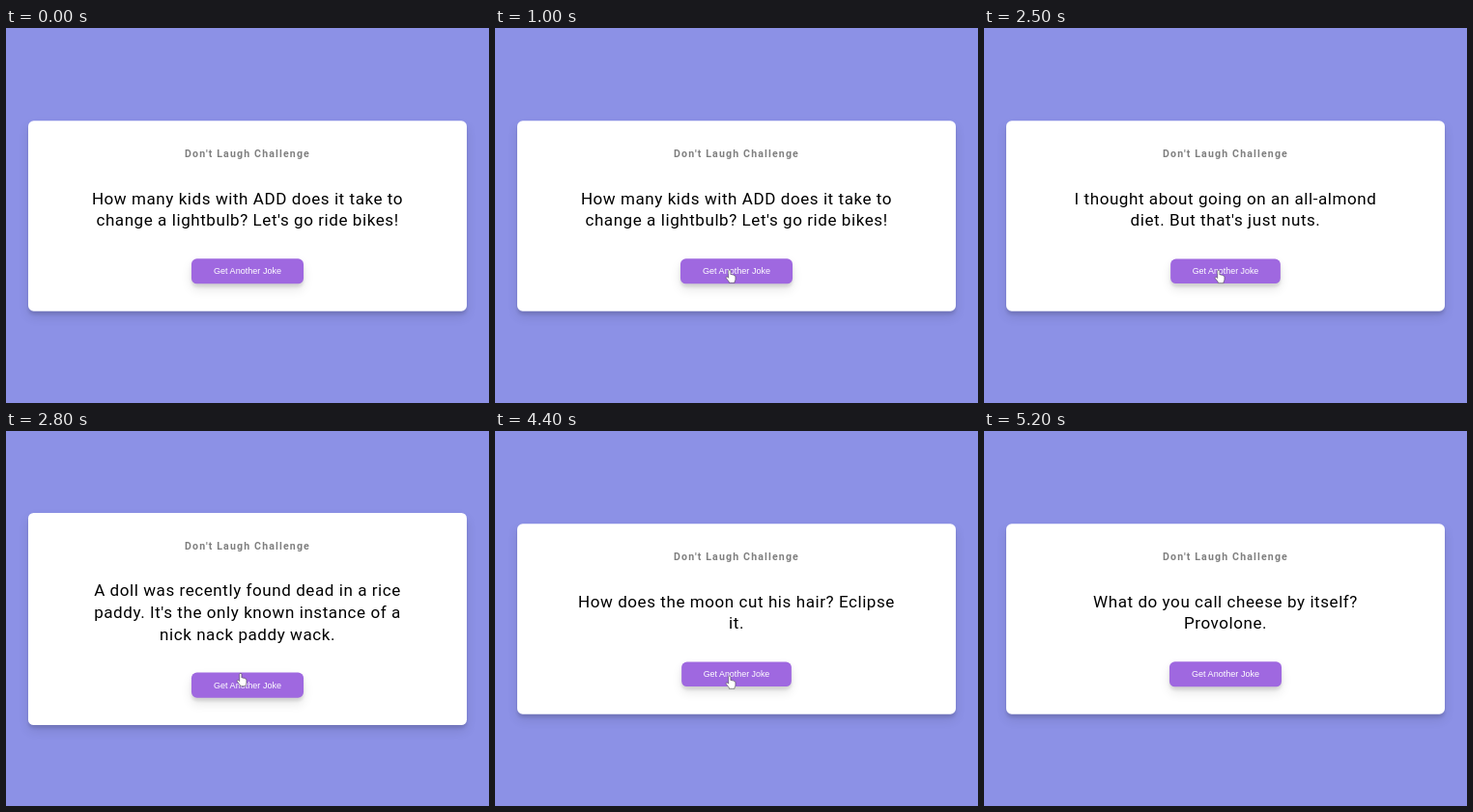
These frames come from a looping animation (500 by 389 pixels, 5.6 s). An HTML page:

```html
<!DOCTYPE html>
<html lang="en">
<head>
<meta charset="utf-8">
<title>Joke card</title>
<style>
  html, body { margin: 0; width: 100%; height: 100%; overflow: hidden; background: #8c91e6; }
  svg { display: block; width: 100%; height: 100%; }
  text { text-anchor: middle; }
  .title { font: 700 18.72px Roboto, sans-serif; letter-spacing: 2px; fill-opacity: .5; }
  .joke { font: 400 30px Roboto, sans-serif; letter-spacing: 1px; }
  .label { font: 400 16px "Liberation Sans", Arial, sans-serif; fill: #fff; }
  .cursor { fill: #fff; stroke: #333; stroke-width: .5; stroke-linejoin: round; }
</style>
</head>
<body>
<svg viewBox="0 0 500 389">
  <defs>
    <filter id="wide" x="-50%" y="-100%" width="200%" height="300%"><feGaussianBlur stdDeviation="10"/></filter>
    <filter id="tight" x="-50%" y="-100%" width="200%" height="300%"><feGaussianBlur stdDeviation="3"/></filter>
  </defs>
  <rect width="500" height="389" fill="#8c91e6"/>
  <g id="card">
    <g id="panel"></g>
    <text class="title" y="67.4">Don't Laugh Challenge</text>
    <g id="joke"></g>
    <g id="button">
      <g id="face"></g>
      <text class="label" y="5.5">Get Another Joke</text>
    </g>
  </g>
  <path id="hand" class="cursor" d="M-1.1 1Q-1.1 0 0 0T1.1 1V4.6Q2.4 4 2.9 5Q4.2 4.5 4.6 5.6Q6.1 5.3 6.1 7V9.4Q6.1 11 5.2 12V13.3H-.5V12.2L-3.5 8.4Q-4 7.2-3 6.9Q-2.2 6.8-1.1 8.2Z"/>
  <path id="arrow" class="cursor" d="M0 0V10L2.4 7.8L4 11.3L5.4 10.7L3.9 7.3H7Z"/>
</svg>
<script>
const LOOP = 5600, STEP = 100, SCALE = 0.5675, CENTER = { x: 250, y: 195 };
const LINE = 40, PAD = 50, TOP = 122, BUTTON = { w: 204.5, h: 46 };

const jokes = [
  { at: 0, lines: ["How many kids with ADD does it take to", "change a lightbulb? Let's go ride bikes!"] },
  { at: 1300, lines: ["I thought about going on an all-almond", "diet. But that's just nuts."] },
  { at: 2800, lines: ["A doll was recently found dead in a rice", "paddy. It's the only known instance of a", "nick nack paddy wack."] },
  { at: 3800, lines: ["How does the moon cut his hair? Eclipse", "it."] },
  { at: 4700, lines: ["What do you call cheese by itself?", "Provolone."] }
];
const presses = [[800, 1000], [1700, 1800], [2500, 2600], [3500, 3600], [4400, 4500]];

// time, x, y of the pointer tip
const path = [
  [300, 257, 360], [400, 250, 315], [500, 245, 272], [600, 242.8, 251],
  [3400, 242.8, 251.5], [3700, 242.8, 254], [4800, 242.8, 254],
  [4900, 244, 284], [5000, 248, 332], [5100, 252, 378]
];

const $ = id => document.getElementById(id);

function add(parent, name, attrs) {
  const el = document.createElementNS("http://www.w3.org/2000/svg", name);
  for (const key in attrs) el.setAttribute(key, attrs[key]);
  return parent.appendChild(el);
}

// Rounded box centred on x = 0 with a two-layer shadow
function drawBox(parent, w, h, top, fill) {
  parent.replaceChildren();
  const box = { x: -w / 2, width: w, height: h, rx: 10 };
  add(parent, "rect", { ...box, y: top + 10, opacity: 0.1, filter: "url(#wide)" });
  add(parent, "rect", { ...box, y: top + 6, opacity: 0.1, filter: "url(#tight)" });
  add(parent, "rect", { ...box, y: top, fill });
}

let shown, buttonY;
function showJoke(joke) {
  if (joke === shown) return;
  shown = joke;
  const textHeight = joke.lines.length * LINE;
  const height = TOP + textHeight + PAD + BUTTON.h + PAD;
  buttonY = TOP + textHeight + PAD + BUTTON.h / 2;
  drawBox($("panel"), 800, height, 0, "#fff");
  $("joke").replaceChildren();
  joke.lines.forEach((line, i) => {
    add($("joke"), "text", { class: "joke", y: TOP + 30.2 + i * LINE }).textContent = line;
  });
  const top = CENTER.y - height * SCALE / 2;
  $("card").setAttribute("transform", `translate(${CENTER.x} ${top}) scale(${SCALE})`);
}

function pointerAt(t) {
  const last = path.length - 1;
  if (t < path[0][0] || t > path[last][0]) return null;
  const i = Math.min(path.findLastIndex(p => p[0] <= t), last - 1);
  const [a, b] = [path[i], path[i + 1]];
  const k = (t - a[0]) / (b[0] - a[0]);
  return { x: a[1] + (b[1] - a[1]) * k, y: a[2] + (b[2] - a[2]) * k };
}

function drawPointer(t) {
  const p = pointerAt(t);
  const onButton = p && p.y < 266;
  for (const [id, visible] of [["hand", onButton], ["arrow", p && !onButton]]) {
    $(id).style.display = visible ? "" : "none";
    if (visible) $(id).setAttribute("transform", `translate(${p.x} ${p.y})`);
  }
}

function render(ms) {
  const t = Math.floor(ms % LOOP / STEP) * STEP;
  showJoke(jokes.findLast(j => j.at <= t));
  const pressed = presses.some(([from, to]) => t >= from && t < to);
  $("button").setAttribute("transform", `translate(0 ${buttonY}) scale(${pressed ? 0.98 : 1})`);
  drawPointer(t);
}

drawBox($("face"), BUTTON.w, BUTTON.h, -BUTTON.h / 2, "#9f68e0");
const start = performance.now();
function tick() {
  render(performance.now() - start);
  requestAnimationFrame(tick);
}
tick();
</script>
</body>
</html>
```
